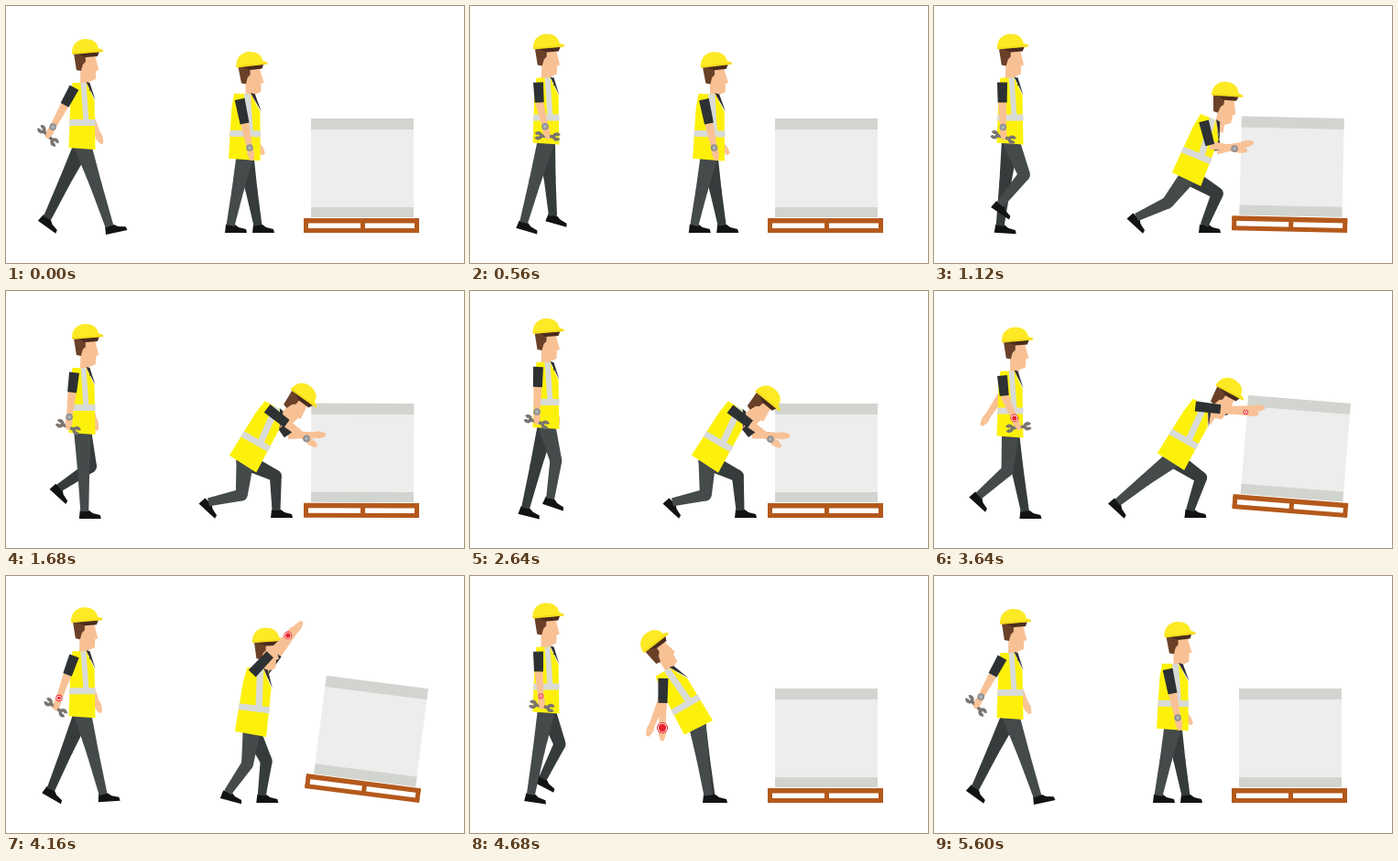
These frames come from a looping animation (500 px wide and 281 px high, 5640 ms). An HTML page with a canvas:

```html
<!DOCTYPE html>
<html lang="en">
<head>
<meta charset="utf-8">
<title>Workers</title>
<style>
html, body { margin: 0; width: 100%; height: 100%; overflow: hidden; background: #fff; }
canvas { display: block; width: 100vw; height: 100vh; }
</style>
</head>
<body>
<canvas id="stage" width="500" height="281"></canvas>
<script>
const ctx = document.getElementById('stage').getContext('2d');
const LOOP = 5640, STEP = 40, MOTION = 5600, STRIDE = 1400;
const RAD = Math.PI / 180, TAU = Math.PI * 2;
const SKIN = '#f8c195', VEST = '#fdf10c', TAPE = '#d9dbd7', SHIRT = '#2d3133', HAIR = '#6a4128',
  HELMET = '#fdea25', NEAR = '#454a4b', FAR = '#363b3c', SHOE = '#121314', WOOD = '#b4591c', RED = '#e8212a';

const STAND = {
  hipX: 261, hipY: 164, lean: 1, nod: -2, handX: 266, handY: 155, back: 245, front: 275, tip: 0
};
const CROUCH = {
  ...STAND, hipX: 259, hipY: 186, lean: 30, nod: 44, handX: 328, handY: 162, back: 221, front: 295
};
const PUSH = { ...CROUCH, hipX: 278, lean: 22, nod: 8, handY: 156, tip: 1.3 };
const BRACE = { ...CROUCH, hipX: 255, nod: 37, handX: 334, handY: 140, back: 191, front: 274 };
const HEAVE = { ...PUSH, hipY: 176, lean: 28, nod: 22, handX: 358, handY: 111, back: 228, tip: 17.5 };
const FLAIL = { ...STAND, lean: -8, nod: -14, handX: 272, handY: 32, back: 252, front: 268 };
const LEAN = {
  ...STAND, hipX: 248, hipY: 162, lean: -30, nod: -33, handX: 210, handY: 166, back: 260, front: 263
};
// Each pose is reached at its time and held until the next move
const SCRIPT = [
  [0, STAND], [1080, PUSH], [1560, CROUCH], [2120, PUSH], [2560, CROUCH],
  [3480, BRACE], [3960, HEAVE], [4320, FLAIL], [4640, LEAN], [5420, STAND]
];
const MOVE = 550;

const clamp = (v, lo, hi) => Math.min(hi, Math.max(lo, v));

function poseAt(t) {
  const i = SCRIPT.findIndex(k => k[0] > t);
  if (i < 0) return STAND;
  const [t0, from] = SCRIPT[i - 1], [t1, to] = SCRIPT[i];
  const span = Math.min(MOVE, t1 - t0);
  const u = clamp(1 - (t1 - t) / span, 0, 1), e = u * u * (3 - 2 * u);
  return Object.fromEntries(Object.keys(from).map(k => [k, from[k] + (to[k] - from[k]) * e]));
}

function poly(color, ...pts) {
  ctx.fillStyle = color;
  ctx.beginPath();
  for (let i = 0; i < pts.length; i += 2) ctx.lineTo(pts[i], pts[i + 1]);
  ctx.fill();
}

function dot(color, x, y, r) {
  ctx.fillStyle = color;
  ctx.beginPath();
  ctx.arc(x, y, r, 0, TAU);
  ctx.fill();
}

function placed(x, y, deg, draw) {
  ctx.save();
  ctx.translate(x, y);
  ctx.rotate(deg * RAD);
  draw();
  ctx.restore();
}

function limb(color, [ax, ay], [bx, by], wa, wb) {
  const d = Math.hypot(bx - ax, by - ay) || 1;
  const nx = (by - ay) / d / 2, ny = (ax - bx) / d / 2;
  poly(color, ax + nx * wa, ay + ny * wa, bx + nx * wb, by + ny * wb,
    bx - nx * wb, by - ny * wb, ax - nx * wa, ay - ny * wa);
}

// Knee (side 1) or elbow (side -1) between two ends
function joint([ax, ay], [bx, by], bone, side) {
  const dx = bx - ax, dy = by - ay, d = Math.hypot(dx, dy) || 1;
  const bend = side * Math.sqrt(Math.max(0, bone * bone - d * d / 4)) / d;
  return [ax + dx / 2 + dy * bend, ay + dy / 2 - dx * bend];
}

// Point fixed to the torso
function onBody([hx, hy, deg], x, y) {
  const c = Math.cos(deg * RAD), s = Math.sin(deg * RAD);
  return [hx + x * c - y * s, hy + x * s + y * c];
}

const swing = ([x, y], deg, len) => [x + len * Math.sin(deg * RAD), y + len * Math.cos(deg * RAD)];

function leg(color, hip, [ax, ay, deg], bone) {
  const knee = joint(hip, [ax, ay], bone, 1);
  placed(ax, ay, deg, () => poly(SHOE, -5, 0, 5, 0, 9, 3, 17, 5, 18, 9, -6, 9));
  dot(color, ...hip, 9.5);
  limb(color, hip, knee, 19, 13);
  dot(color, ...knee, 6.5);
  limb(color, knee, [ax, ay + 1], 13, 9);
}

function arm(shoulder, elbow, wrist) {
  const d = Math.hypot(wrist[0] - elbow[0], wrist[1] - elbow[1]) || 1;
  const along = n => wrist.map((v, i) => v + (v - elbow[i]) / d * n);
  limb(SKIN, elbow, wrist, 9, 6.5);
  limb(SKIN, wrist, along(7), 6.5, 8);
  limb(SKIN, along(7), along(14), 8, 3.5);
  limb(SHIRT, shoulder, elbow, 11, 10);
}

function torso([x, y, deg], girth) {
  placed(x, y, deg, () => {
    ctx.scale(girth, 1);
    poly(VEST, -11, -68, 4, -68, 13, -49, 14, 5, -15, 3, -13, -52);
    poly(TAPE, -2, -68, 4, -68, 7, -26, 1, -26);
    poly(TAPE, -14, -28, 14, -28, 14, -21, -14.5, -21);
    poly(SHIRT, 4, -69, 8, -68, 14, -49);
  });
}

function head(x, y, deg) {
  placed(x, y, deg, () => {
    poly(SKIN, -4, -32, 11, -31, 15.5, -14, 12.5, -13, 12, -4, 5, -1, 5, 8, -5, 6);
    poly(HAIR, -12, -33, 1, -32, 1, -23, -2, -20, -4, -13, -9, -14);
    poly('#4b2c1d', -11, -33, 16, -34, 14, -29, 1, -28);
    ctx.fillStyle = HELMET;
    ctx.beginPath();
    ctx.moveTo(-14, -32);
    ctx.bezierCurveTo(-14, -43, -7, -48, 1, -48);
    ctx.bezierCurveTo(9, -48, 14, -44, 15, -38);
    ctx.lineTo(20, -36);
    ctx.lineTo(20, -34);
    ctx.closePath();
    ctx.fill();
    poly('#f5dc1b', -14, -33, 20, -36, 20, -34, -13, -31);
  });
}

function watch([x, y], alert, pulse) {
  if (!alert) {
    dot('#8d8f92', x, y, 3.8);
    dot('#b2b3b5', x, y, 2);
    return;
  }
  const r = 2.8 + 3.2 * pulse;
  dot(RED, x, y, r);
  dot('#fff', x, y, r - .9);
  dot(RED, x, y, r - 1.8);
}

function wrench([x, y], deg) {
  placed(x, y, deg, () => {
    ctx.strokeStyle = '#7a7470';
    ctx.lineWidth = 3.6;
    ctx.beginPath();
    ctx.moveTo(-8, 0);
    ctx.lineTo(8, 0);
    ctx.stroke();
    for (const side of [0, Math.PI]) {
      ctx.beginPath();
      ctx.arc(side ? -10 : 10, 0, 2.9, side + .5, side + TAU - .5);
      ctx.stroke();
    }
  });
}

// Ankle and shoe angle: half a cycle on the ground, half in the air
function step(phase) {
  const p = phase % 1;
  if (p < .5) {
    const heel = Math.max(0, p * 4 - 1) ** 1.5;
    return [113 - 136 * p, 240 - 9 * heel, 36 * heel - 12 * Math.max(0, 1 - p / .08)];
  }
  const u = p * 2 - 1, arc = Math.sin(Math.PI * u);
  return [45 + 68 * u ** 1.8, 231 + 9 * u - 22 * arc ** 1.5, 36 + 12 * arc - 48 * u ** 2.5];
}

// Arms snap backwards briefly and drift forwards
function reach(shoulder, phase) {
  const w = -Math.cos(TAU * (phase - .06));
  const back = 38 * Math.max(0, -w) ** 4, ahead = Math.max(0, w);
  const fore = 25 * ahead - back, elbow = swing(shoulder, 6 * ahead - back, 22);
  return { fore, joints: [shoulder, elbow, swing(elbow, fore, 27)] };
}

function walker(p, alert, pulse) {
  const bob = Math.cos(2 * TAU * (p - .1));
  const hip = [83.5, 150.5 + 5 * bob], body = [...hip, 0];
  arm(...reach(onBody(body, 3, -61), p + .5).joints);
  leg(FAR, hip, step(p + .5), 41);
  leg(NEAR, hip, step(p), 41);
  head(...onBody(body, 1.5 + 2.8 * bob, -68), 0);
  torso(body, 1);
  const { fore, joints } = reach(onBody(body, -9, -63), p), wrist = joints[2];
  wrench(swing(wrist, fore, 11), 17 - fore);
  arm(...joints);
  watch(wrist, alert, pulse);
}

function load(tip) {
  const box = (color, x, y, w, h) => { ctx.fillStyle = color; ctx.fillRect(x, y, w, h); };
  placed(451, 248, tip, () => {
    ctx.translate(-451, -248);
    box('#ededed', 333, 123, 112, 108);
    box('#d2d5cf', 333, 123, 112, 12);
    box('#d2d5cf', 333, 220, 112, 11);
    for (const x of [325, 387, 446]) box(WOOD, x, 234, 5, 12);
    box(WOOD, 325, 232, 126, 5.5);
    box(WOOD, 325, 243, 126, 5);
  });
}

function pusher(pose, alert, pulse) {
  const { hipX, hipY, lean, nod, handX, handY, back, front } = pose;
  const hip = [hipX, hipY], body = [hipX, hipY, lean];
  const heel = clamp((hipX - back - 20) * 2.5, 0, 43);
  const bentArm = (shoulder, wrist) => arm(shoulder, joint(shoulder, wrist, 27, -1), wrist);
  bentArm(onBody(body, 3, -60), [handX + 7 + Math.min(0, lean) * .6, handY - 4]);
  leg(FAR, hip, [front, 239, 0], 37);
  leg(NEAR, hip, [back, 239 - heel * .21, heel], 37);
  head(...onBody(body, 4 + .3 * Math.max(0, lean), .17 * Math.max(0, nod) - 66), nod);
  torso(body, 1.2);
  bentArm(onBody(body, -7, -62), [handX, handY]);
  watch([handX, handY], alert, pulse);
}

function draw(now) {
  const t = Math.floor(now % LOOP / STEP) * STEP;
  const alert = t > 2900 && t < 5300;
  const pulse = (1 - Math.cos(TAU * (t - 3640) / 693)) / 2;
  const pose = poseAt(t);
  ctx.fillStyle = '#fff';
  ctx.fillRect(0, 0, 500, 281);
  load(pose.tip);
  walker(t % MOTION / STRIDE, alert, .5 - .5 * pulse);
  pusher(pose, alert, pulse);
}

const start = performance.now();
function tick() {
  draw(performance.now() - start);
  requestAnimationFrame(tick);
}
tick();
</script>
</body>
</html>
```
